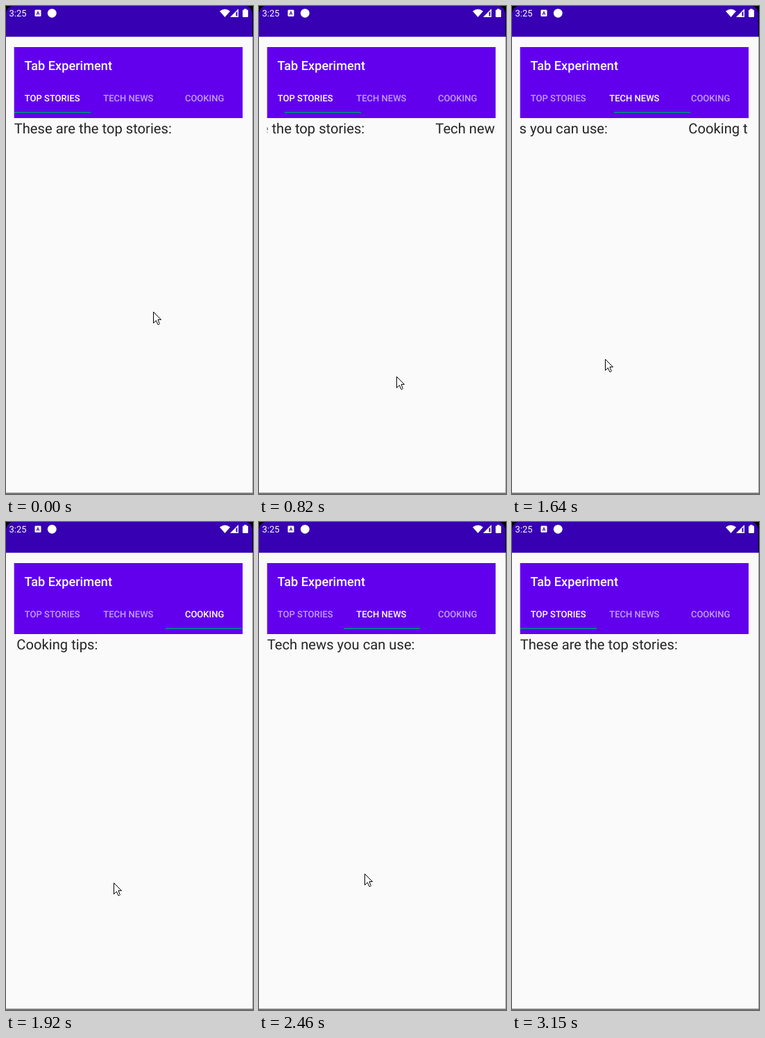
These frames come from a looping animation (356 by 701 pixels, 3300 ms). An HTML page:

```html
<!DOCTYPE html>
<html lang="en">
<head>
<meta charset="utf-8">
<title>Tab Experiment</title>
<style>
  html, body { margin: 0; width: 100%; height: 100%; overflow: hidden; background: #fafafa; }
  svg { display: block; width: 100%; height: 100%; }
  text { font-family: Roboto, sans-serif; text-rendering: geometricPrecision; }
  .title { font-size: 18.2px; font-weight: 500; fill: #fff; }
  .tab { font-size: 13px; font-weight: 500; fill: #fff; fill-opacity: .62; text-anchor: middle; }
  .tab.on { fill-opacity: 1; }
  .page { font-size: 20.2px; fill: #242424; }
  .clock { font-size: 13px; fill: #fff; }
</style>
</head>
<body>
<svg viewBox="0 0 356 701">
  <defs>
    <clipPath id="pager"><rect x="11.7" y="161" width="329.3" height="538"/></clipPath>
  </defs>
  <rect width="356" height="701" fill="#fafafa"/>

  <!-- status bar -->
  <rect width="356" height="44.2" fill="#3700b3"/>
  <path d="M0 0H8Q2 2 0 10ZM356 0H347Q353 2 355 10V44H356Z" fill="#000"/>
  <text class="clock" x="4.5" y="15">3:25</text>
  <rect x="41.5" y="5.5" width="9" height="9.5" rx="1.2" fill="#fff"/>
  <path d="M44 12.6L46 7.8L48 12.6M44.8 11.2H47.2" fill="none" stroke="#3700b3"/>
  <circle cx="66.3" cy="10.3" r="6.4" fill="#fff"/>
  <path d="M308 7.4Q315.5 1.6 323 7.4L315.5 16Z" fill="#fff"/>
  <path d="M323 16L335 4V16Z" fill="#fff"/>
  <path d="M331.5 9.5L333.5 7.5V14.5H331.5Z" fill="#3700b3"/>
  <path d="M341 6.2Q341 5.4 342 5.4H343.2V4H346.6V5.4H348Q349 5.4 349 6.2V15Q349 16 348 16H342Q341 16 341 15Z" fill="#fff"/>

  <!-- app bar -->
  <rect x="11.7" y="59" width="329.3" height="102" fill="#6200ee"/>
  <text class="title" x="26.6" y="92">Tab Experiment</text>
  <g id="tabs"></g>
  <rect id="bar" y="152" width="110" height="1.8" fill="#018786"/>

  <g clip-path="url(#pager)"><g id="pages"></g></g>

  <!-- window edge -->
  <path d="M355.5 44V700" stroke="#a0a0a0"/>
  <rect y="699" width="356" height="2" fill="#808080"/>

  <path id="cursor" d="M.5 .5V16.5L4.4 12.8L6.9 18.5H8.4L9.3 17.6L7 11.6H11.5Z"
        fill="#fff" stroke="#000"/>
</svg>
<script>
const LOOP = 3300, TICKS = 24, TICK = LOOP / TICKS, LEAD = 36;
const LEFT = 11.7, PAGE = 329.2, TAB = 109.7;
const $ = id => document.getElementById(id);
const clamp = u => Math.min(1, Math.max(0, u));

const sections = [
  ["TOP STORIES", "These are the top stories:"],
  ["TECH NEWS", "Tech news you can use:"],
  ["COOKING", "Cooking tips:"]
];

const swipes = [
  { start: 5, span: 3.6, dir: 1 },
  { start: 11, span: 3.6, dir: 1 },
  { start: 15.8, span: 2.2, dir: -1 },
  { start: 18.74, span: 3.6, dir: -1 }
];

// Pointer turning points: tick, x, y
const turns = [
  [0, 212, 439], [1, 179, 500], [2, 326, 586], [4, 291, 543], [5, 291, 543],
  [8, 123, 523], [11, 222, 515], [12, 134, 507], [16, 162, 522],
  [17, 230, 511], [18, 152, 505], [19, 158, 503], [22, 362, 590]
];

// A slow drag that becomes a fling and settles.
const fling = u => 1 - (1 - u * u) ** 3.8;

const pageAt = tick => swipes.reduce(
  (sum, { start, span, dir }) => sum + dir * fling(clamp((tick - start) / span)), 0);

function pointerAt(tick) {
  const i = turns.findLastIndex(k => k[0] <= tick);
  const [t0, x0, y0] = turns[i];
  const [t1, x1, y1] = turns[i + 1] ?? [t0 + 1, x0, y0];
  const u = 1 - (1 - (tick - t0) / (t1 - t0)) ** 2;
  return [Math.round(x0 + (x1 - x0) * u), Math.round(y0 + (y1 - y0) * u)];
}

function addText(parent, cls, x, y, str) {
  const el = document.createElementNS("http://www.w3.org/2000/svg", "text");
  el.setAttribute("class", cls);
  el.setAttribute("x", x);
  el.setAttribute("y", y);
  el.textContent = str;
  parent.append(el);
  return el;
}

const tabs = sections.map(([label, body], i) => {
  addText($("pages"), "page", LEFT + i * PAGE, 183, body);
  return addText($("tabs"), "tab", 66.7 + i * TAB, 137, label);
});

function draw() {
  const t = performance.now() % LOOP;
  const tick = Math.min(TICKS - 1, Math.floor((t + LEAD) / TICK));
  const page = pageAt(tick);
  const [x, y] = pointerAt(tick);
  $("cursor").setAttribute("transform", `translate(${x} ${y})`);
  $("pages").setAttribute("transform", `translate(${-page * PAGE} 0)`);
  // the indicator trails the pages slightly
  $("bar").setAttribute("x", Math.round(12 + pageAt(tick - .08) * TAB));
  tabs.forEach((tab, i) => tab.classList.toggle("on", i === Math.round(page)));
  requestAnimationFrame(draw);
}
draw();
</script>
</body>
</html>
```
